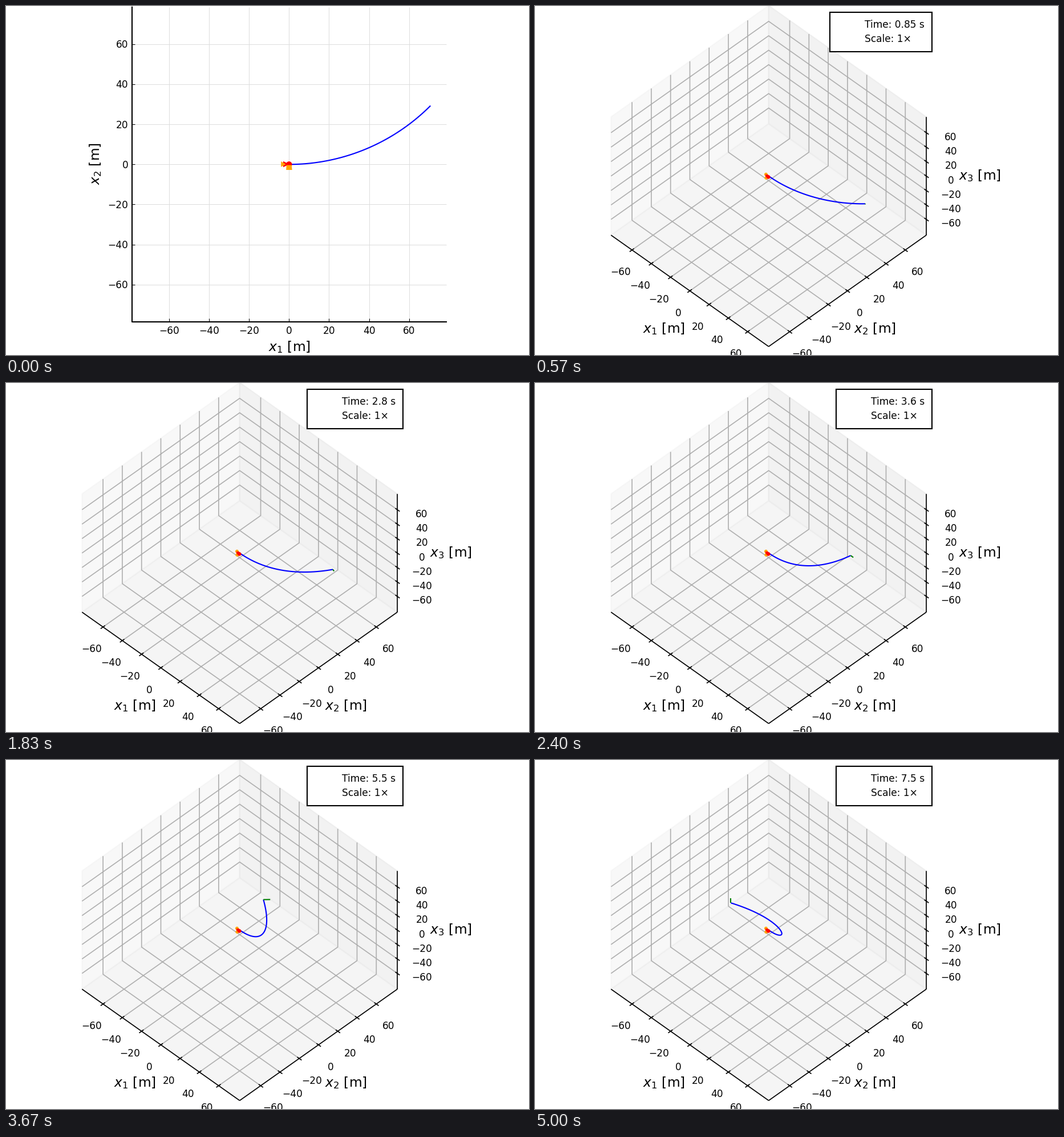
A matplotlib script for the animation above (5030 ms loop, 917 by 611 pixels).

```python
import numpy as np
import matplotlib.pyplot as plt
from matplotlib.animation import FuncAnimation
from matplotlib.patches import Circle, Polygon, Rectangle

W, H, DPI = 917, 611, 100
STEPS, LOOP = 150, 5030       # simulation steps after the first, loop in ms
PT = 72 / DPI                 # points per pixel
UNIT = 1.528 * DPI / 72       # one line-width unit in pixels
TICK_PX, LABEL_PX = 8 * UNIT, 11 * UNIT
TICKS = range(-60, 61, 20)

# Orthographic view: pixels per metre across, in depth and in height
AX, AY, AZ = 1.6895, 1.192, 1.265
CENTER = np.array([409.7, 297.7])
EDGE = 81.8                   # half width of the box
BACK = np.array([-1, 1, -1])  # corner where the three walls meet
RADIUS, ARC = 100, np.pi / 4  # the unloaded beam

fig = plt.figure(figsize=(W / DPI, H / DPI), dpi=DPI, facecolor="white")
ax = fig.add_axes([0, 0, 1, 1])
ax.set_xlim(0, W)
ax.set_ylim(H, 0)
ax.axis("off")

flat, space = [], []


def lines(group, paths, color, width, z=2, cap="butt", **kw):
    """Draw several paths as one artist, parted by gaps."""
    gap = [(np.nan, np.nan)]
    x, y = np.vstack([np.vstack([p, gap]) for p in paths])[:-1].T
    art, = ax.plot(x, y, color=color, lw=width * PT, zorder=z,
                   solid_capstyle=cap, **kw)
    group.append(art)
    return art


def text(group, x, y, s, px=TICK_PX, ha="center", z=4, **kw):
    art = ax.text(x, y, s, fontsize=px * PT, family="DejaVu Sans", ha=ha,
                  va="baseline", color="black", zorder=z, **kw)
    group.append(art)
    return art


def shape(group, patch):
    ax.add_patch(patch)
    group.append(patch)
    return patch


def poly(group, pts, color, z):
    shape(group, Polygon(pts, fc=color, ec="none", zorder=z))


def dot(group, x, y, r, color, z):
    shape(group, Circle((x, y), r, fc=color, ec="none", zorder=z))


def number(v):
    return str(v).replace("-", "\u2212")


def project(p):
    x, y, z = np.moveaxis(np.asarray(p, float), -1, 0)
    return CENTER + np.stack([AX * (x + y), AY * (x - y) - AZ * z], axis=-1)


def build_flat():
    ox, oy, k = 496.3, 277.3, 3.507
    half = RADIUS * ARC * k
    left, right, top, bottom = ox - half, ox + half, oy - half, oy + half
    xs = [ox + k * v for v in TICKS]
    ys = [oy - k * v for v in TICKS]
    lines(flat, [[(x, top), (x, bottom)] for x in xs]
          + [[(left, y), (right, y)] for y in ys], "black", UNIT / 2, 1, alpha=0.13)
    lines(flat, [[(x, bottom), (x, bottom - 5.5)] for x in xs]
          + [[(left, y), (left + 5.5, y)] for y in ys], "black", UNIT / 2)
    lines(flat, [[(left, top), (left, bottom), (right, bottom)]], "black", UNIT,
          cap="projecting")
    for v, x, y in zip(TICKS, xs, ys):
        text(flat, x, 573.5, number(v))
        text(flat, 214.2, y + 6.4, number(v), ha="right")
    text(flat, 497, 604, "$x_1$ [m]", LABEL_PX)
    text(flat, 163.7, 276.5, "$x_2$ [m]", LABEL_PX, rotation=90,
         rotation_mode="anchor")

    a = np.linspace(0, ARC, 60)
    r = RADIUS * k
    lines(flat, [np.stack([ox + r * np.sin(a), oy - r * (1 - np.cos(a))], -1)],
          "blue", UNIT, 3)
    dot(flat, ox, oy, 5.2, "red", 5)
    poly(flat, [(486, 271.8), (486, 282.2), (497, 277)], "red", 6)
    poly(flat, [(482.3, 272), (482.3, 281.8), (490.5, 277)], "orange", 7)
    poly(flat, [(491.8, 278.5), (500.8, 278.5), (501.6, 287), (491.2, 287)],
         "orange", 7)


def build_walls():
    grid = []
    for i, shade in enumerate((0.95, 0.90, 0.925)):
        j, k = (n for n in range(3) if n != i)
        flip_j, flip_k = BACK.copy(), BACK.copy()
        flip_j[j] *= -1
        flip_k[k] *= -1
        pane = EDGE * np.array([BACK, flip_j, flip_j + flip_k - BACK, flip_k])
        rgba = (shade, shade, shade, 0.5)
        shape(space, Polygon(project(pane), fc=rgba, ec=rgba, lw=UNIT * PT, zorder=0))
        for v in TICKS:
            path = EDGE * np.array([flip_j, BACK, flip_k], float)
            path[:, i] = v
            grid.append(project(path))
    lines(space, grid, "#b0b0b0", 0.8 * UNIT, 1)


def build_axes():
    # For each axis: the edge it runs along, tick direction, label offset
    rulers = [
        ((0, -1, -1), (0, -1, 0), (-20.2, 44)),
        ((1, 0, -1), (1, 0, 0), (21.8, 44)),
        ((1, 1, 0), (1, 0, 0), (43, 12.9)),
    ]
    paths = []
    for i, (edge, way, shift) in enumerate(rulers):
        base, way = EDGE * np.array(edge), np.array(way)
        along = np.eye(3)[i]
        paths.append(project([base - EDGE * along, base + EDGE * along]))
        for v in TICKS:
            p = base + v * along
            paths.append(project([p - 2.1 * way, p + 2.5 * way]))
            text(space, *(project(p) + shift), number(v))
    lines(space, paths, "black", 0.8 * UNIT)
    for i, (x, y) in enumerate([(226.3, 572.5), (595.7, 572.5), (779.7, 304.2)]):
        text(space, x, y, f"$x_{i + 1}$ [m]", LABEL_PX)


def build_support():
    dot(space, 405, 294.8, 3, "orange", 7)
    dot(space, 405.3, 301, 2.9, "orange", 7)
    dot(space, 409.2, 299.4, 3.3, "red", 8)
    poly(space, [(403.8, 295.2), (408.5, 295), (411.5, 299), (404.6, 299.8)], "red", 8)


# The beam is a Bezier curve clamped at the root. Only its free end is keyed:
# time, tip on screen, handle from the tip back into the beam.
HANDLE = 4 / 3 * np.tan(ARC / 4) * RADIUS
TIP0 = project(RADIUS * np.array([np.sin(ARC), 1 - np.cos(ARC), 0]))
BACK0 = -HANDLE * np.array([AX * 2 ** 0.5, 0])
KEYS = np.array([
    [0, *TIP0, *BACK0],
    [1.6, 578.3, 342, -63, 3.5],
    [2.8, 572.4, 325.4, -62.4, 11.6],
    [4.4, 521, 275.4, -29, 38],
    [5.5, 451.3, 244.4, 15.7, 55.6],
    [6.4, 386.6, 238.5, 60, 50],
    [7.5, 343.4, 250.2, 99.6, 30.8],
])
TIMES, POSES = KEYS[:, 0], KEYS[:, 1:]
SLOPES = np.gradient(POSES, TIMES, axis=0, edge_order=2)
SLOPES[0] = 0                 # starts from rest
U = np.linspace(0, 1, 81)[:, None]


def free_end(t):
    """Tip and handle from a smooth cubic through the keys."""
    i = min(np.searchsorted(TIMES, t, "right") - 1, len(TIMES) - 2)
    h = TIMES[i + 1] - TIMES[i]
    s = (t - TIMES[i]) / h
    p = ((1 + 2 * s) * (1 - s) ** 2 * POSES[i] + s * (1 - s) ** 2 * h * SLOPES[i]
         + s * s * (3 - 2 * s) * POSES[i + 1] + s * s * (s - 1) * h * SLOPES[i + 1])
    return p[:2], p[2:]


def beam_and_load(t):
    tip, handle = free_end(t)
    reach = HANDLE * (1 - 0.1 * min(t / 4.4, 1) ** 3)
    root_end = CENTER + reach * np.array([AX, AY])
    beam = ((1 - U) ** 3 * CENTER + 3 * U * (1 - U) ** 2 * root_end
            + 3 * U ** 2 * (1 - U) * (tip + handle) + U ** 3 * tip)
    # The load grows with time and turns with the tip
    turn = np.pi * (t / 7.5) ** 2.2
    tail = 0.91 * t * np.array([AX * 2 ** 0.5 * np.sin(turn), AZ * np.cos(turn)])
    return beam, np.array([tip, tip + tail])


def clock(k):
    """Two significant digits, ties to even."""
    return k / 20 if k < 20 else round(k / 2) / 10


build_flat()
build_walls()
build_axes()
build_support()
beam_line = lines(space, [[(0, 0)]], "blue", UNIT, 5)
load_line = lines(space, [[(0, 0)]], "green", UNIT, 6)
legend = shape(space, Rectangle((0, 11), 0, 68.8, fc="white", ec="black",
                                lw=UNIT * PT, joinstyle="miter", zorder=9))
time_text = text(space, 0, 37.5, "", ha="left", z=10)
scale_text = text(space, 0, 63.2, "Scale: 1\u00d7", ha="left", z=10)


def draw(i):
    k = min((i + 1) // 2, STEPS)   # two frames per step, centred on its time
    for art in flat:
        art.set_visible(k == 0)
    for art in space:
        art.set_visible(k > 0)
    beam, load = beam_and_load(k / 20)
    beam_line.set_data(*beam.T)
    load_line.set_data(*load.T)

    value = str(clock(k))
    left = 589 - 0.636 * TICK_PX * (len(value) - 3)
    time_text.set_text(f"Time: {value} s")
    time_text.set_x(left)
    scale_text.set_x(left)
    legend.set_x(left - 61)
    legend.set_width(696.3 - (left - 61))
    return flat + space


FRAMES = 2 * (STEPS + 1)
anim = FuncAnimation(fig, draw, frames=FRAMES, init_func=lambda: draw(0),
                     interval=LOOP / FRAMES, repeat=True, repeat_delay=0, blit=False)
plt.show()
```
